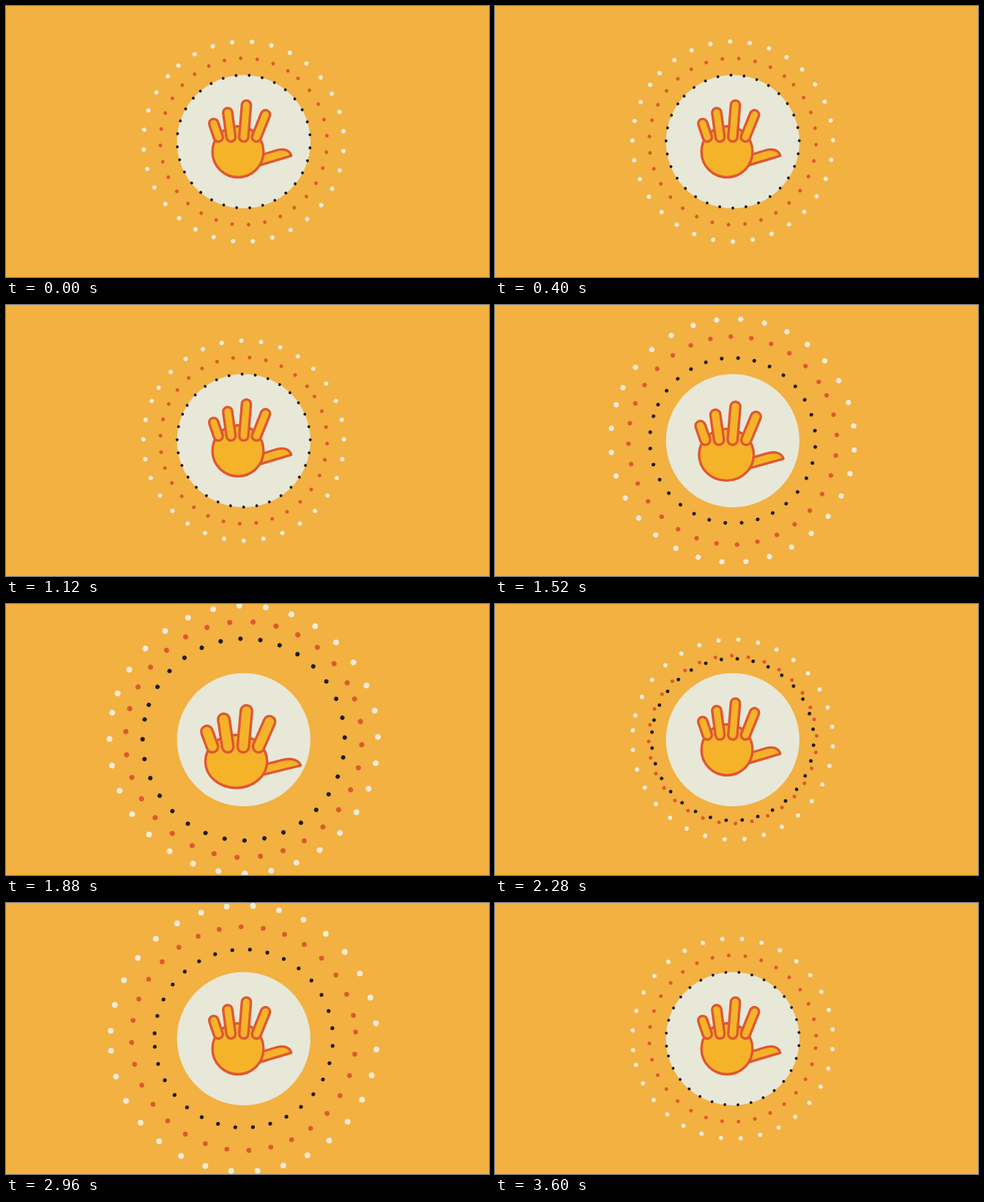
Animation of 660 by 371 pixels, one loop 3640 ms. Source, as an HTML page:

```html
<!DOCTYPE html>
<html lang="en">
<head>
<meta charset="utf-8">
<title>Hand and dotted rings</title>
<style>
html, body { margin: 0; width: 100%; height: 100%; overflow: hidden; background: #f2b141; }
svg { display: block; width: 100vw; height: 100vh; }
</style>
</head>
<body>
<svg viewBox="0 0 660 371">
  <rect width="660" height="371" fill="#f2b141"/>
  <circle cx="324.8" cy="185.8" r="91.2" fill="#e8e8d9"/>
  <g id="hand" stroke-linecap="round" stroke-linejoin="round"></g>
  <g id="rings"></g>
</svg>
<script>
const LOOP = 3640, FRAME = 40;
const RED = '#de5831', YELLOW = '#f5b329', CREAM = '#f0eada', BLACK = '#1f1b18';
const CX = 324.8, CY = 185.6;
const DOTS = 32, STEP = 11.335, SPIN = 15.56; // degrees, degrees per second
const SEAM = 40.6;                            // first dot's angle at the start
const LINE = 3.4;
const PALM = { x: 317, y: 199.6, r: 34.9 };
const KNUCKLES = 179.4;

const $ = id => document.getElementById(id);

function set(el, attrs) {
  for (const k in attrs) el.setAttribute(k, attrs[k]);
}

function add(parent, tag, attrs) {
  const el = document.createElementNS('http://www.w3.org/2000/svg', tag);
  set(el, attrs);
  parent.appendChild(el);
  return el;
}

// Point at a distance and a clockwise angle from straight up
function polar(r, deg) {
  const a = deg * Math.PI / 180;
  return [r * Math.sin(a), -r * Math.cos(a)];
}

// Eased rise from start to peak, then fall to end
function pulse(t, start, peak, end) {
  if (t <= start || t >= end) return 0;
  const p = t < peak ? (t - start) / (peak - start) : (end - t) / (end - peak);
  return (1 - Math.cos(Math.PI * p)) / 2;
}

// Rings from the outside in; the last dot sits closer to the first
const rings = [CREAM, RED, BLACK].map((fill, i) => {
  const r = 137 - 23 * i;
  const el = add($('rings'), 'g', { fill });
  for (let n = 0; n < DOTS; n++) {
    const [cx, cy] = polar(r, n * STEP);
    add(el, 'circle', { cx, cy, r: r * 0.0217 });
  }
  return { el, r, dir: i === 1 ? 1 : -1, lag: 30 * i ** 3 };
});

function drawRing({ el, r, dir, lag }, t) {
  const angle = dir * (SEAM + SPIN * t / 1000);
  const push = pulse(t, 1120, 1820 + 0.6 * lag, 2290 + lag);
  const swell = pulse(t, 2290 + lag, 2820 + lag, 3450 + 0.6 * lag);
  const scale = 1 + 48.3 / r * push + 0.372 * swell;
  el.setAttribute('transform', `translate(${CX} ${CY}) rotate(${angle}) scale(${scale})`);
}

const outlined = { fill: YELLOW, stroke: RED, 'stroke-width': LINE };
const thumb = add($('hand'), 'path', outlined);
const palm = add($('hand'), 'ellipse', outlined);

// Length and lean of each finger, little finger first
const fingers = [[19.6, -18.7], [33.8, -7.8], [44, 4.7], [33, 21.9]].map(([length, lean], i) => {
  const root = [290.1 + 17.4 * i, KNUCKLES];
  const [dx, dy] = polar(length, lean);
  return {
    root,
    tip: [root[0] + dx, root[1] + dy],
    edge: add($('hand'), 'line', { stroke: RED }),
    core: add($('hand'), 'line', { stroke: YELLOW })
  };
});

// The pressed hand drops, widens, and its fingers lengthen
function press([x, y], k) {
  const rise = y - KNUCKLES;
  return [
    x + k * (0.21 * (x - PALM.x) - 2.4),
    y + k * (16 + (rise < 0 ? 0.115 * rise : 0))
  ];
}

function drawHand(k) {
  const at = (x, y) => press([x, y], k).join(' ');
  thumb.setAttribute('d', `M${at(344, 205.5)}L${at(368, 198)}` +
    `C${at(380, 194)} ${at(388, 198)} ${at(389.8, 205.2)}L${at(345, 218.5)}Z`);

  const [cx, cy] = press([PALM.x, PALM.y], k);
  set(palm, { cx, cy, rx: PALM.r * (1 + 0.21 * k), ry: PALM.r * (1 + 0.04 * k) });

  const width = 15.8 + 3.2 * k;
  for (const { root, tip, edge, core } of fingers) {
    const [x1, y1] = press(tip, k), [x2, y2] = press(root, k);
    set(edge, { x1, y1, x2, y2, 'stroke-width': width });
    set(core, { x1, y1, x2, y2, 'stroke-width': width - 2 * LINE });
  }
}

function draw(t) {
  for (const ring of rings) drawRing(ring, t);
  drawHand(pulse(t, 1300, 1860, 2260));
}

const begin = performance.now();

function tick() {
  const t = (performance.now() - begin) % LOOP;
  draw(Math.floor(t / FRAME) * FRAME);
  requestAnimationFrame(tick);
}

draw(0);
requestAnimationFrame(tick);
</script>
</body>
</html>
```
